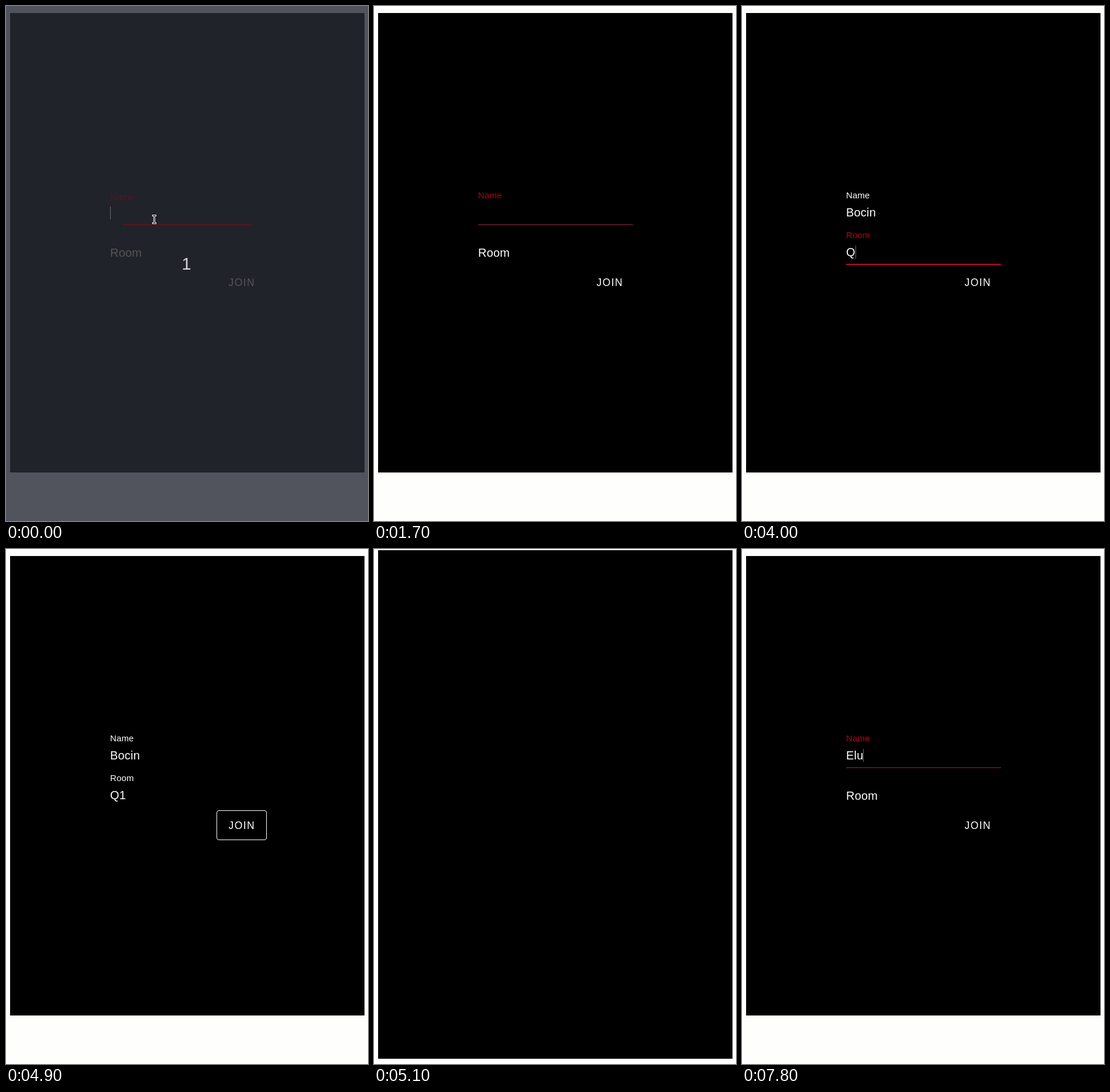
Animation, 619 px wide and 881 px high, one loop 8000 ms. Source, as an HTML page:

```html
<!DOCTYPE html>
<html lang="en">
<head>
<meta charset="utf-8">
<title>Join a room</title>
<style>
  :root { --red: #b00020; --dim: #555; --dimred: #561424; }
  html, body { margin: 0; width: 100%; height: 100%; overflow: hidden; background: #fefefd; }
  .stage {
    position: relative; width: 619px; height: 881px; overflow: hidden;
    font: 20px/22px "Liberation Sans", Arial, sans-serif; color: #fff;
    animation-name: page;
  }
  .stage, .stage * { animation-duration: 8s; animation-timing-function: step-end; animation-iteration-count: infinite; }
  .stage div { position: absolute; white-space: nowrap; }
  .panel { left: 7px; width: 606px; animation-name: panel; }
  .form { inset: 0; animation-name: form; }
  .field { left: 178px; top: 0; width: 265px; }
  .room { top: 68px; }
  .label, .typed { left: 0; letter-spacing: .009375em; }
  .typed { top: 342px; width: 0; overflow: hidden; }
  .line { top: 373px; height: 2px; background: #bd0c24; }
  .name .label { animation-name: name-label; }
  .name .line { animation-name: name-line; }
  .room .label { animation-name: room-label; }
  .room .line { animation-name: room-line; }
  .first { animation-name: type-first; }
  .second { animation-name: type-second; }
  .code { animation-name: type-code; }
  .caret { left: 178px; width: 1px; height: 22px; background: #fff; animation-name: caret; }
  .join {
    left: 360px; top: 447px; width: 84px; height: 49px; border: 1px solid transparent; border-radius: 4px;
    animation-name: ring;
  }
  .join span {
    position: absolute; left: 19.4px; top: 15px;
    font-size: 17.5px; line-height: 20px; letter-spacing: 1.5px;
  }
  .count { left: 300.5px; top: 425px; font-size: 29px; line-height: 32px; color: #d4d5d6; animation-name: count; }
  .mouse { position: absolute; left: 249px; top: 356px; animation-name: mouse; }

  @keyframes page {
    0% { background: #51545c; color: var(--dim); }
    1.25%, 100% { background: #fefefd; color: #fff; }
  }
  @keyframes panel {
    0% { top: 12px; height: 786px; background: #20232a; }
    1.25% { top: 12px; height: 786px; background: #000; }
    62.5% { top: 12px; height: 0; background: #000; }
    63.75% { top: 2px; height: 870px; background: #000; }
    77.5%, 100% { top: 12px; height: 786px; background: #000; }
  }
  @keyframes form {
    0% { visibility: visible; }
    62.5% { visibility: hidden; }
    77.5%, 100% { visibility: visible; }
  }

  /* labels: resting 20px, floating 15px */
  @keyframes name-label {
    0% { top: 319px; font-size: 16px; line-height: 17px; color: var(--dimred); }
    1.25% { top: 315px; font-size: 15px; line-height: 17px; color: var(--red); }
    45% { top: 315px; font-size: 15px; line-height: 17px; color: #d88090; }
    46.25% { top: 315px; font-size: 15px; line-height: 17px; color: #fff; }
    77.5% { top: 343px; font-size: 20px; line-height: 22px; color: #fff; }
    83.75% { top: 337px; font-size: 18px; line-height: 20px; color: #d88090; }
    85% { top: 319px; font-size: 16px; line-height: 17px; color: var(--red); }
    86.25%, 100% { top: 315px; font-size: 15px; line-height: 17px; color: var(--red); }
  }
  @keyframes room-label {
    0% { top: 343px; font-size: 20px; line-height: 22px; color: var(--dim); }
    1.25% { top: 343px; font-size: 20px; line-height: 22px; color: #fff; }
    45% { top: 319px; font-size: 16px; line-height: 17px; color: #c03048; }
    46.25% { top: 315px; font-size: 15px; line-height: 17px; color: var(--red); }
    58.75% { top: 315px; font-size: 15px; line-height: 17px; color: #d88090; }
    60% { top: 315px; font-size: 15px; line-height: 17px; color: #fff; }
    77.5%, 100% { top: 343px; font-size: 20px; line-height: 22px; color: #fff; }
  }

  /* underlines grow from the centre and fade out */
  @keyframes name-line {
    0% { left: 21px; width: 223px; opacity: 1; background: var(--dimred); }
    1.25% { left: 0; width: 265px; opacity: 1; }
    45% { left: 0; width: 265px; opacity: .5; }
    46.25% { left: 0; width: 265px; opacity: 0; }
    83.75% { left: 80px; width: 105px; opacity: .5; }
    85% { left: 21px; width: 223px; opacity: .9; }
    86.25%, 100% { left: 0; width: 265px; opacity: 1; }
  }
  @keyframes room-line {
    0% { left: 0; width: 0; opacity: 0; }
    45% { left: 21px; width: 223px; opacity: .9; }
    46.25% { left: 0; width: 265px; opacity: 1; }
    58.75% { left: 0; width: 265px; opacity: .5; }
    60%, 100% { left: 0; width: 265px; opacity: 0; }
  }

  /* typing: each step uncovers one more letter */
  @keyframes type-first {
    0% { width: 0; }
    33.75% { width: 13.5px; }
    36.25% { width: 24.8px; }
    38.75% { width: 35px; }
    40% { width: 39.6px; }
    41.25% { width: 52px; }
    62.5%, 100% { width: 0; }
  }
  @keyframes type-second {
    0% { width: 0; }
    92.5% { width: 13.5px; }
    95% { width: 18.2px; }
    97.5%, 100% { width: 30px; }
  }
  @keyframes type-code {
    0% { width: 0; }
    50% { width: 15.8px; }
    55% { width: 28px; }
    62.5%, 100% { width: 0; }
  }
  @keyframes caret {
    0% { left: 178px; top: 343px; opacity: 1; background: #6a6b6e; }
    1.25% { left: 178px; top: 343px; opacity: 1; }
    7.5% { left: 178px; top: 343px; opacity: 0; }
    15% { left: 178px; top: 343px; opacity: 1; }
    21.25% { left: 178px; top: 343px; opacity: 0; }
    28.75% { left: 178px; top: 343px; opacity: 1; }
    33.75% { left: 192px; top: 342px; opacity: 1; }
    36.25% { left: 203px; top: 342px; opacity: 1; }
    38.75% { left: 213px; top: 342px; opacity: 1; }
    40% { left: 218px; top: 342px; opacity: 1; }
    41.25% { left: 229px; top: 342px; opacity: 1; }
    45% { left: 178px; top: 411px; opacity: 1; }
    50% { left: 194px; top: 410px; opacity: 1; }
    55% { left: 205px; top: 410px; opacity: 1; }
    58.75% { left: 178px; top: 343px; opacity: 0; }
    83.75% { left: 178px; top: 343px; opacity: 1; }
    91.25% { left: 178px; top: 343px; opacity: 0; }
    92.5% { left: 192px; top: 342px; opacity: 1; }
    95% { left: 196px; top: 342px; opacity: 1; }
    97.5%, 100% { left: 207px; top: 342px; opacity: 1; }
  }
  @keyframes ring {
    0% { border-color: transparent; }
    58.75% { border-color: #fff9; }
    60% { border-color: #fff; }
    62.5%, 100% { border-color: transparent; }
  }
  @keyframes count {
    0% { opacity: 1; }
    1.25%, 100% { opacity: 0; }
  }
  @keyframes mouse {
    0% { opacity: 1; }
    5%, 100% { opacity: 0; }
  }
</style>
</head>
<body>
<div class="stage">
  <div class="panel"></div>
  <div class="form">
    <div class="field name">
      <div class="label">Name</div>
      <div class="typed first">Bocin</div>
      <div class="typed second">Elu</div>
      <div class="line"></div>
    </div>
    <div class="field room">
      <div class="label">Room</div>
      <div class="typed code">Q1</div>
      <div class="line"></div>
    </div>
    <div class="caret"></div>
    <div class="join"><span>JOIN</span></div>
  </div>
  <div class="count">1</div>
  <svg class="mouse" width="9" height="19" fill="none" stroke-linecap="square">
    <path d="M2.5 2.5h4M4.5 2.5v13M2.5 15.5h4" stroke="#fff" stroke-width="3"/>
    <path d="M2.5 2.5h4M4.5 2.5v13M2.5 15.5h4" stroke="#000"/>
  </svg>
</div>
</body>
</html>
```
